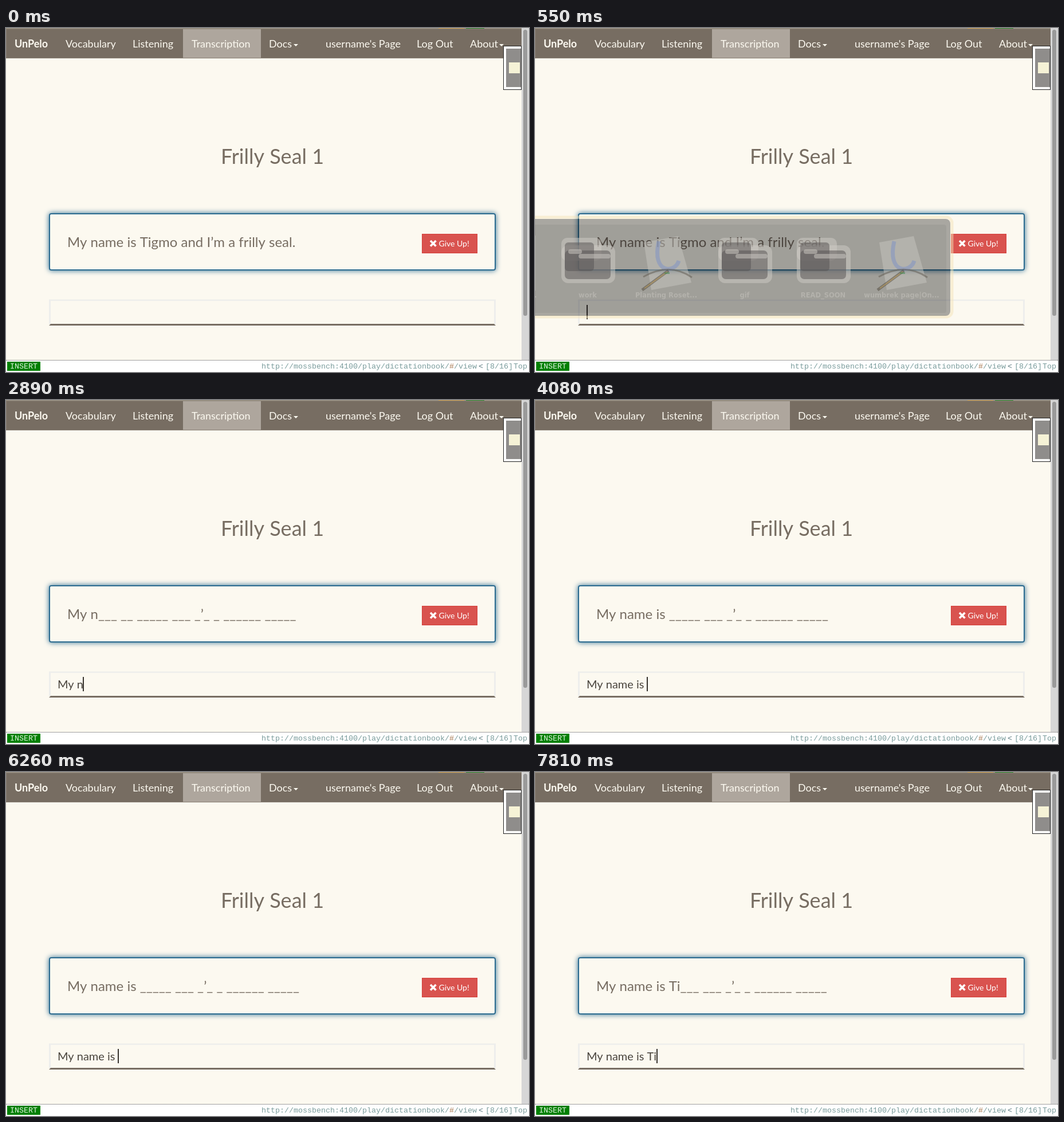
An HTML page with a canvas that plays this animation: 913x600 px, repeating every 7.89 s.

```html
<!DOCTYPE html>
<html lang="en">
<head>
<meta charset="utf-8">
<title>Transcription game</title>
<style>
html, body { margin: 0; width: 100%; height: 100%; overflow: hidden; background: #fcf9f0; }
canvas { display: block; }
</style>
</head>
<body>
<canvas id="stage" width="913" height="600"></canvas>
<script>
const ctx = document.getElementById('stage').getContext('2d');
const LOOP = 7890;
const LATO = 'Lato, sans-serif';
const PAPER = '#fcf9f0', BROWN = '#776d62';
const SENTENCE = 'My name is Tigmo and I’m a frilly seal.';

// [start ms, correct letters typed, wrong letter]
const KEYS = [
  [0, 0], [1550, 1], [1590, 2], [1930, 3], [2890, 4], [3020, 5],
  [3170, 6], [3270, 7], [3430, 8], [3810, 9], [3920, 10], [4080, 11],
  [4500, 11, 't'], [5300, 11], [5930, 11, 'o'], [6260, 11],
  [6520, 12], [7050, 12, 'h'], [7580, 12], [7810, 13]
];

function rect(x, y, w, h, color) {
  ctx.fillStyle = color;
  ctx.fillRect(x, y, w, h);
}

function round(x, y, w, h, r, fill, stroke, line = 1) {
  ctx.beginPath();
  ctx.roundRect(x, y, w, h, r);
  if (fill) { ctx.fillStyle = fill; ctx.fill(); }
  if (stroke) { ctx.strokeStyle = stroke; ctx.lineWidth = line; ctx.stroke(); }
}

function poly(points, color) {
  ctx.beginPath();
  points.forEach(([x, y]) => ctx.lineTo(x, y));
  ctx.closePath();
  ctx.fillStyle = color;
  ctx.fill();
}

function line(x1, y1, x2, y2, color, width) {
  ctx.beginPath();
  ctx.moveTo(x1, y1);
  ctx.lineTo(x2, y2);
  ctx.strokeStyle = color;
  ctx.lineWidth = width;
  ctx.stroke();
}

// Draws text and returns the x where it ends.
function text(str, x, y, font, color, align = 'left') {
  ctx.font = font;
  ctx.fillStyle = color;
  ctx.textAlign = align;
  ctx.fillText(str, x, y);
  return x + ctx.measureText(str).width;
}

function navbar() {
  rect(0, 0, 900, 2, '#a19a89');
  rect(755, 0, 45, 1, '#d5a44f');
  rect(803, 0, 32, 1, '#2c8a2c');
  rect(0, 1, 900, 52, '#8a8177');
  rect(1, 2, 899, 50, BROWN);
  rect(309, 2, 136, 50, '#aea69d');
  text('UnPelo', 15, 34, `bold 18px ${LATO}`, '#fcf9f0');
  const items = [['Vocabulary', 104], ['Listening', 221], ['Transcription', 324],
    ['Docs', 459], ['username\'s Page', 558], ['Log Out', 717], ['About', 810]];
  for (const [label, x] of items) text(label, x, 34, `18px ${LATO}`, '#fcf9f0');
  for (const x of [502, 861]) poly([[x, 28], [x + 8, 28], [x + 4, 32]], '#fcf9f0');
}

function sideHandle() {
  rect(868, 31, 32, 77, '#222');
  rect(869, 32, 30, 75, '#fff');
  rect(873, 36, 26, 67, '#8f8d8b');
  rect(878, 60, 19, 19, '#f5f2d6');
}

function scrollbar() {
  rect(900, 0, 13, 579, '#d6d6d6');
  round(903, 3, 7, 499, 3.5, '#9a9a9a');
}

function statusBar() {
  rect(0, 579, 913, 21, '#fff');
  ctx.setLineDash([1, 1]);
  line(0, 579.5, 913, 579.5, '#444', 1);
  ctx.setLineDash([]);
  rect(2, 582, 58, 16, '#008000');
  const mono = '13.33px "Liberation Mono", monospace', tint = '#7a9c9c';
  text('INSERT', 7, 594, mono, '#e4f3e4');
  const end = text('http://mossbench:4100/play/dictationbook/', 446, 594, mono, tint);
  text('/view', text('#', end, 594, mono, '#a87850'), 594, mono, tint);
  text('<', 825, 594, mono, '#58767c');
  text('[8/16]', 837, 594, mono, tint);
  text('Top', 886, 594, mono, tint);
}

function prompt(typed, wrong) {
  ctx.save();
  ctx.shadowColor = wrong ? '#d58a5c' : '#2b6b90';
  ctx.shadowBlur = wrong ? 12 : 10;
  round(75, 323, 780, 100, 4, wrong ? '#936b5c' : '#2b6b90');
  if (wrong) ctx.fill();
  ctx.restore();
  round(77, 325, 776, 96, 2, PAPER);

  const font = `24px ${LATO}`;
  const hidden = SENTENCE.slice(typed).replace(/[^ ’]/g, '_');
  const shown = typed ? SENTENCE.slice(0, typed) + hidden : SENTENCE;
  const end = text(shown, 107, 382, font, BROWN);
  if (wrong) {
    const width = ctx.measureText(wrong).width;
    rect(end, 358, width, 30, '#eed9c8');
    text(wrong, end, 382, font, BROWN);
    rect(end, 375, width, 1.5, BROWN);
  }

  rect(726, 359, 97, 34, '#d43f3a');
  rect(727, 360, 95, 32, '#d9534f');
  line(741, 371, 750.5, 380.5, '#fff', 3.6);
  line(750.5, 371, 741, 380.5, '#fff', 3.6);
  text('Give Up!', 755.5, 381, `14px ${LATO}`, '#fff');
}

function answer(typed, wrong, caret) {
  rect(75, 473.5, 780, 43, '#eeeeec');
  rect(78, 476, 774, 41, PAPER);
  poly([[75, 519], [78, 516], [852, 516], [855, 519]], BROWN);
  const end = text(SENTENCE.slice(0, typed) + wrong, 90, 503, `20px ${LATO}`, '#4a453e');
  if (caret) rect(Math.floor(end), 483, 2, 25, '#38342f');
}

function folder(x) {
  round(x - 46, 366, 70, 40, 10, '#cfccc6');
  round(x - 46, 379, 94, 66, 12, '#cfccc6');
  round(x - 40, 374, 51, 50, 6, '#565252');
  round(x - 40, 388, 80, 50, 7, '#565252');
  round(x - 34, 386, 24, 8, 4, '#cfccc6');
  round(x - 16, 394, 56, 8, 4, '#cfccc6');
}

function sheet(x) {
  poly([[x - 39, 374], [x + 21, 363], [x + 44, 444], [x - 26, 457]], '#c8c5c0');
  ctx.beginPath();
  ctx.moveTo(x - 13, 372);
  ctx.bezierCurveTo(x - 26, 430, x + 16, 428, x + 22, 406);
  ctx.strokeStyle = '#7d92c8';
  ctx.lineWidth = 7;
  ctx.stroke();
  line(x - 42, 457, x + 4, 423, '#4f463b', 5);
  line(x - 38, 454, x + 2, 425, '#d0a95c', 2);
  ctx.beginPath();
  ctx.moveTo(x - 40, 434);
  ctx.quadraticCurveTo(x + 6, 408, x + 45, 435);
  ctx.strokeStyle = '#605b50';
  ctx.lineWidth = 3;
  ctx.stroke();
  rect(x - 3, 426, 9, 3, '#3b8a4c');
}

function dock(alpha) {
  ctx.save();
  ctx.globalAlpha = alpha;
  round(-30, 330, 758, 174, 10, null, '#f5e3b8', 5);
  round(-30, 333, 755, 169, 8, 'rgba(0,0,0,.66)');
  round(-30, 343, 748, 154, 4, 'rgba(0,0,0,.1)');
  round(-60, 362, 61, 96, 0, '#c8c5c0');
  const items = [[folder, 'work'], [sheet, 'Planting Roset...'], [folder, 'gif'],
    [folder, 'READ_SOON'], [sheet, 'wumbrek page|On...']];
  items.forEach(([icon, label], i) => {
    const x = 92 + 137 * i;
    icon(x);
    text(label, x, 470, 'bold 11.5px "DejaVu Sans", sans-serif', '#c8c5c0', 'center');
  });
  text('...', 3, 470, 'bold 11.5px "DejaVu Sans", sans-serif', '#c8c5c0', 'right');
  ctx.restore();
}

function draw(t) {
  const [, typed, wrong = ''] = KEYS.findLast(key => key[0] <= t);
  rect(0, 0, 913, 600, PAPER);
  navbar();
  text('Frilly Seal 1', 465, 237, `36px ${LATO}`, BROWN, 'center');
  prompt(typed, wrong);
  answer(typed, wrong, t >= 220);
  if (t >= 460 && t < 600) dock(t < 550 ? 0.8 : 0.5);
  scrollbar();
  sideHandle();
  statusBar();
}

const start = performance.now();
function tick() {
  draw((performance.now() - start) % LOOP);
  requestAnimationFrame(tick);
}
tick();
</script>
</body>
</html>
```
